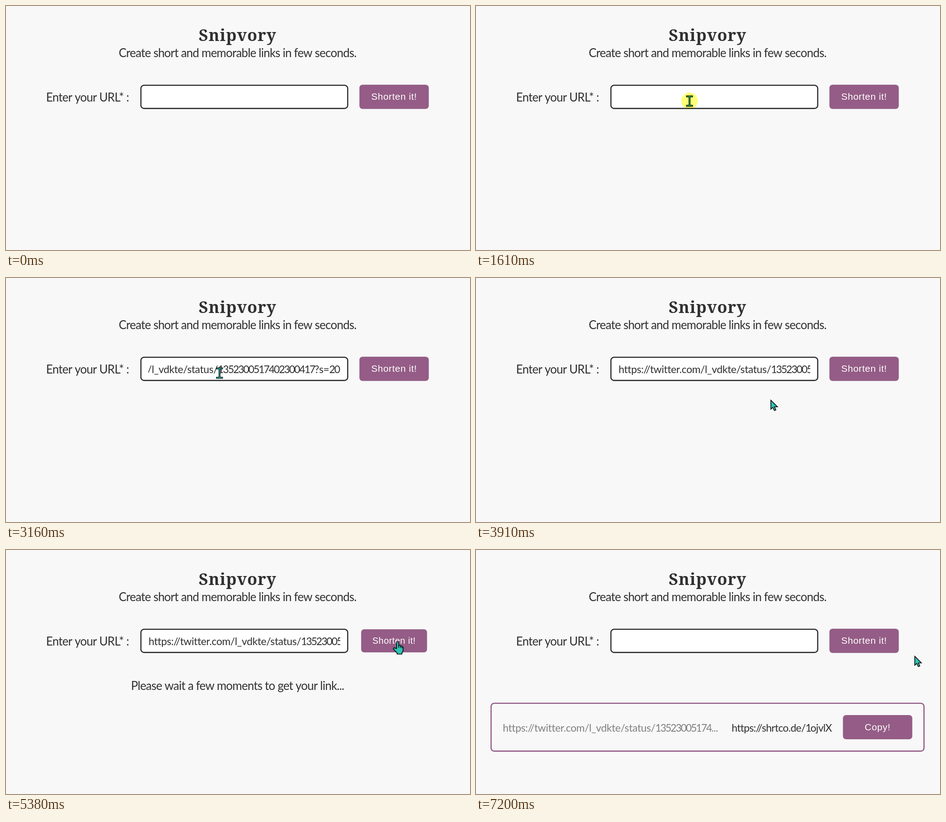
Recreate the animation shown at these times as an HTML page with a canvas. Size 1030 px wide and 544 px high, loop 8000 ms.

```html
<!DOCTYPE html>
<html lang="en">
<head>
<meta charset="utf-8">
<title>Link shortener demo</title>
<style>
  html, body { margin: 0; width: 100%; height: 100%; overflow: hidden; background: #f8f8f8; }
  canvas { display: block; width: 1030px; height: 544px; }
</style>
</head>
<body>
<canvas id="stage" width="1030" height="544"></canvas>
<script>
const ctx = document.getElementById('stage').getContext('2d');
const LOOP = 8000;
const INK = '#303030', PLUM = '#945c86', TEAL = '#2ec4b6', PAPER = '#f8f8f8';

const LABEL = '26px Lato, sans-serif';
const LABEL_GAP = -0.77;
const LINK = '23px Lato, sans-serif';
const LINK_GAP = -0.4;
const BUTTON = '20.8px "Liberation Sans", Arial, sans-serif';
const TITLE = 'bold 36px "Noto Serif", Georgia, serif';

const HEAD = 'https://twitter.com/l_vdkte/status/1352300517';
const URL_TEXT = HEAD + '402300417?s=20';
const URL_CUT = HEAD + '4...';

// Cursor poses: time, x, y, shape; each holds until the next one.
const POSES = [
  [450, 769, 414, 'arrow'], [533, 692, 330, 'arrow'], [617, 653, 295, 'arrow'], [700, 642.5, 286, 'arrow'],
  [900, 637, 283, 'arrow'], [978, 597, 260, 'arrow'], [1056, 537, 232, 'arrow'],
  [1134, 502, 209, 'beam'], [1212, 480, 208, 'beam'], [1290, 474, 212, 'beam'],
  [3910, 653.5, 270.5, 'arrow'], [3990, 782, 266, 'arrow'], [4070, 826, 233, 'arrow'],
  [4150, 848, 216, 'hand'], [4230, 860, 206, 'hand'], [4310, 865, 202, 'hand'], [4390, 866, 201, 'hand'],
  [5380, 869, 203, 'hand'], [5460, 886, 214, 'hand'], [5540, 913, 227, 'hand'],
  [5620, 940, 237, 'arrow'], [5700, 959, 239, 'arrow'], [5780, 970, 236, 'arrow'], [5860, 973, 235, 'arrow']
];

const ARROW = new Path2D('M1 2V22L5.3 18L8.8 25L12.2 23.5L9 16.7H15.7Z');
const BEAM = new Path2D('M-5.5 -10.5H5.5M0 -10.5V10.5M-5.5 10.5H5.5');
const HAND = new Path2D(
  'M-2 17V3.5Q-2 1 .3 1T2.6 3.5V10Q6 8.5 6.6 11Q9.6 10 10 12.5Q12.5 12 12.5 15V20' +
  'Q12.5 24 10 26V29H-1V26Q-5 23 -9 17.5Q-9.5 14.5 -6.5 15Z');
const KNUCKLES = new Path2D('M2.6 10V15M6.6 11V15.5M10 12.5V16');

const within = (t, a, b) => t >= a && t < b;
const clamp = v => Math.max(0, Math.min(1, v));
const smooth = v => v * v * (3 - 2 * v);

function write(str, x, y, font, color, spacing = 0, align = 'left') {
  ctx.font = font;
  ctx.fillStyle = color;
  ctx.letterSpacing = spacing + 'px';
  ctx.textAlign = align;
  ctx.fillText(str, x, y);
}

// Links set their digits tighter than their letters.
function linkRuns(str, spacing) {
  ctx.font = LINK;
  return str.split(/(\d+)/).filter(Boolean).map(run => {
    const gap = /\d/.test(run) ? spacing - 1.64 : spacing;
    ctx.letterSpacing = gap + 'px';
    return { run, gap, width: ctx.measureText(run).width };
  });
}

function writeLink(str, x, y, color, spacing = LINK_GAP, toRight = false) {
  const runs = linkRuns(str, spacing);
  if (toRight) x -= runs.reduce((sum, r) => sum + r.width, 0);
  for (const r of runs) {
    write(r.run, x, y, LINK, color, r.gap);
    x += r.width;
  }
}

function box(x, y, w, h, fill, stroke) {
  ctx.beginPath();
  ctx.roundRect(x, y, w, h, 7);
  ctx.fillStyle = fill;
  ctx.fill();
  if (!stroke) return;
  ctx.strokeStyle = stroke;
  ctx.lineWidth = 2.6;
  ctx.stroke();
}

function button(label, cx, cy, scale = 1) {
  ctx.save();
  ctx.translate(cx, cy);
  ctx.scale(scale, scale);
  box(-77, -27, 154, 54, PLUM);
  write(label, 0, 6.5, BUTTON, '#fff', 0.6, 'center');
  ctx.restore();
}

function buttonScale(t) {
  const press = smooth(clamp((t - 4110) / 280));
  const release = smooth(clamp((t - 5580) / 280));
  return 1 - 0.05 * (press - release);
}

function caret(x) {
  ctx.fillStyle = INK;
  ctx.fillRect(x, 187, 1.5, 31);
}

function field(t) {
  box(299.5, 176.8, 459, 51.6, '#fff', INK);
  if (within(t, 1680, 2160)) caret(316.3);
  if (!within(t, 2640, 7200)) return;
  ctx.save();
  ctx.beginPath();
  ctx.rect(316, 180, 426, 46);
  ctx.clip();
  if (t < 3230) writeLink(URL_TEXT, 740, 212, INK, LINK_GAP, true);
  else writeLink(URL_TEXT, 316.5, 212, INK);
  if (t < 3160) caret(740);
  ctx.restore();
}

function result() {
  box(33.5, 341.8, 961, 106.6, PAPER, PLUM);
  writeLink(URL_CUT, 59.5, 405, '#808080');
  writeLink('https://shrtco.de/1ojvlX', 567.5, 405, INK, -0.7);
  button('Copy!', 891.5, 395);
}

function outline(path, width, color) {
  ctx.lineWidth = width;
  ctx.strokeStyle = color;
  ctx.stroke(path);
}

function cursor(t) {
  const pose = POSES.findLast(p => p[0] <= t);
  if (!pose) return;
  const [, x, y, shape] = pose;
  ctx.save();
  ctx.translate(x, y);
  if (shape === 'beam') {
    ctx.lineCap = 'square';
    outline(BEAM, 4, '#000');
    outline(BEAM, 1.6, TEAL);
  } else {
    const path = shape === 'hand' ? HAND : ARROW;
    ctx.lineJoin = shape === 'hand' ? 'round' : 'miter';
    ctx.fillStyle = TEAL;
    ctx.fill(path);
    outline(path, 1.6, '#000');
    if (shape === 'hand') outline(KNUCKLES, 1.4, '#000');
  }
  ctx.restore();
}

// The click marker tints whatever lies under it.
function clickSpot(x, y) {
  ctx.save();
  ctx.globalCompositeOperation = 'multiply';
  ctx.beginPath();
  ctx.arc(x, y, 18.5, 0, Math.PI * 2);
  ctx.fillStyle = '#ffff78';
  ctx.fill();
  ctx.restore();
}

function draw(t) {
  ctx.fillStyle = PAPER;
  ctx.fillRect(0, 0, 1030, 544);
  write('Snipvory', 514, 78, TITLE, INK, 1, 'center');
  write('Create short and memorable links in few seconds.', 514, 114, LABEL, INK, LABEL_GAP, 'center');
  write('Enter your URL* :', 89, 213, LABEL, INK, LABEL_GAP);
  field(t);
  button('Shorten it!', 861.5, 202.5, buttonScale(t));
  if (within(t, 4920, 7200)) {
    write('Please wait a few moments to get your link...', 514, 312, LABEL, INK, LABEL_GAP, 'center');
  }
  if (t >= 7200) result();
  cursor(t);
  if (within(t, 1610, 1850)) clickSpot(474, 211.5);
  if (within(t, 4700, 4920)) clickSpot(866, 201);
}

const start = performance.now();
function tick() {
  draw((performance.now() - start) % LOOP);
  requestAnimationFrame(tick);
}
tick();
</script>
</body>
</html>
```
